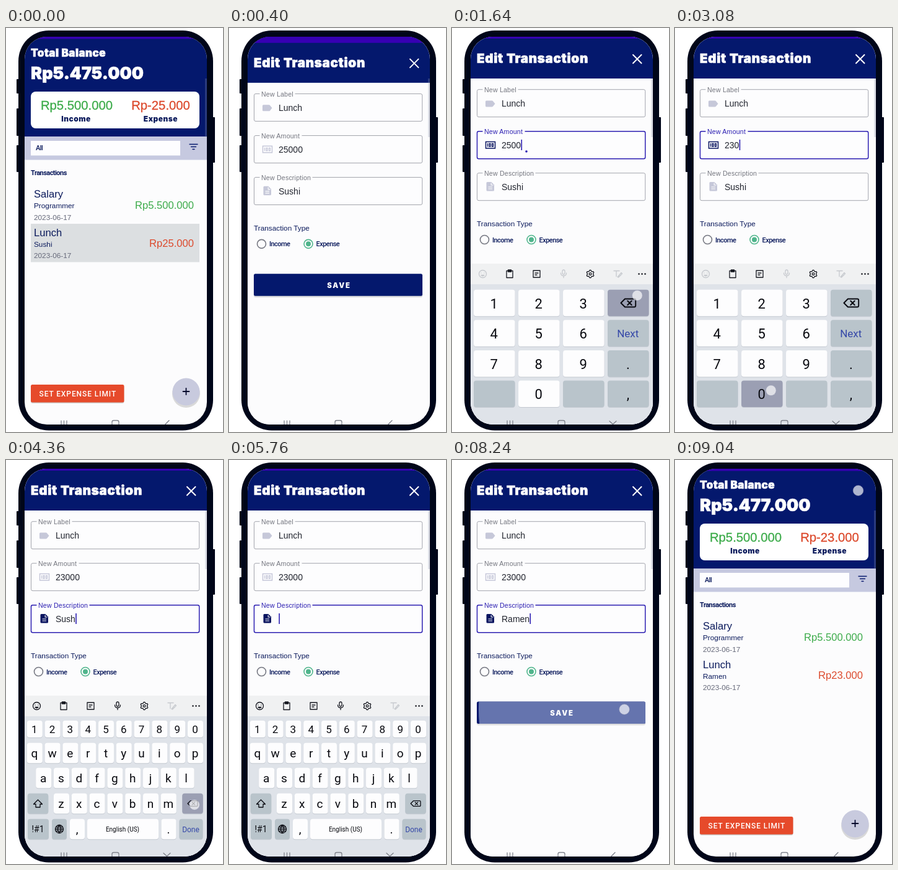
An HTML page for the animation above (9080 ms loop, 350 px wide and 648 px high).

```html
<!DOCTYPE html>
<html lang="en">
<head>
<meta charset="utf-8">
<title>Expense tracker</title>
<style>
  html, body { margin: 0; width: 100%; height: 100%; overflow: hidden; background: #fff; }
  svg { display: block; width: 350px; height: 648px; }
  text { font-family: "Liberation Sans", Arial, sans-serif; fill: #0b1a5c; white-space: pre; }
  .heavy { font-family: Inter, sans-serif; font-weight: 900; letter-spacing: .5px; }
  .title { stroke: #fff; stroke-width: .7px; }
  .narrow { font-family: Roboto, sans-serif; font-size: 11px; font-weight: 500; letter-spacing: -.55px; }
  .key { font-family: Roboto, sans-serif; fill: #08090f; text-anchor: middle; }
  .line { fill: none; stroke: currentColor; stroke-width: 1.3; stroke-linecap: round; stroke-linejoin: round; }
</style>
</head>
<body>
<svg id="stage" viewBox="0 0 350 648"></svg>
<script>
const LOOP = 9080;
const NAVY = '#04186d', PURPLE = '#3700b3', FOCUS = '#2c1fb2', PAPER = '#fcfcfd', FRAME = '#000619';
const GREEN = '#3cab4a', RED = '#dc4a2d', GREY_KEY = '#b9c4cb', PRESSED_KEY = '#9b9fb3';

const rect = (x, y, w, h, fill, more = '') =>
  `<rect x="${x}" y="${y}" width="${w}" height="${h}" fill="${fill}" ${more}/>`;
const text = (x, y, size, value, more = '') =>
  `<text x="${x}" y="${y}" font-size="${size}" ${more}>${value}</text>`;
const line = (d, more = '') => `<path class="line" d="${d}" ${more}/>`;
const group = (id, content, more = '') => `<g id="${id}" ${more}>${content}</g>`;
const fill = color => `style="fill:${color}"`;
const middle = 'text-anchor="middle"';

// Transaction list
function listRow(y, title, noteId, note, priceId, price, color) {
  return text(45, y, 16.6, title) +
    text(45, y + 17, 11.8, note, `id="${noteId}"`) +
    text(45, y + 35.5, 11.8, '2023-06-17', fill('#66697a')) +
    text(303, y + 17.5, 16.6, price, `id="${priceId}" text-anchor="end" ${fill(color)}`);
}

function listScreen() {
  return rect(30, 14, 294, 622, PAPER) + rect(30, 14, 294, 160, NAVY) + rect(30, 14, 294, 3.5, PURPLE) +
    text(40, 46, 17, 'Total Balance', `class="heavy title" ${fill('#fff')}`) +
    text(40, 81.5, 27, '', 'id="balance" class="heavy title" style="fill:#fff;letter-spacing:.1px"') +
    rect(40, 102, 272, 59, '#fff', 'rx="8"') +
    text(114, 131, 20.3, 'Rp5.500.000', `${middle} stroke="${GREEN}" stroke-width=".3" ${fill(GREEN)}`) +
    text(249.5, 131, 20.3, '', `id="spent" ${middle} stroke="${RED}" stroke-width=".3" ${fill(RED)}`) +
    text(113, 149.5, 12, 'Income', `class="heavy" ${middle}`) +
    text(249.5, 149.5, 12, 'Expense', `class="heavy" ${middle}`) +
    rect(30, 174, 294, 37.5, '#c6c9e0') + rect(40, 181, 241, 23.5, '#fdfdff') +
    text(48, 196, 11, 'All', 'class="narrow"') +
    line('M296 186.5h13M298.500 190.500h8M301 194.500h3', `color="${NAVY}"`) +
    text(40, 235.5, 11, 'Transactions', 'class="narrow" style="font-weight:600"') +
    rect(40, 314, 272, 61.5, '#dcdfe1', 'id="rowPress"') +
    listRow(272, 'Salary', 'note1', 'Programmer', 'price1', 'Rp5.500.000', GREEN) +
    listRow(333.5, 'Lunch', 'note2', '', 'price2', '', RED) +
    rect(40, 573.5, 150.5, 28.5, '#000', 'rx="3" opacity=".18"') +
    rect(40, 572, 150.5, 28.5, '#e64a2b', 'rx="2.500"') +
    text(53.5, 591, 12, 'SET EXPENSE LIMIT',
      'style="font-family:Roboto,sans-serif;font-weight:500;letter-spacing:.9px;fill:#fff"') +
    '<circle cx="290.500" cy="586.500" r="22.500" opacity=".14"/><circle cx="290.500" cy="583.500" r="22" fill="#c8cade"/>' +
    line('M285.500 583h10M290.500 578v10', 'color="#05092c" style="stroke-width:1.8"');
}

// Edit form
const icons = {
  label: '<path d="M55.500 116.500h9q1 0 1.500 .7l3.500 4.300-3.500 4.300q-.5 .7-1.500 .7h-9q-1.500 0-1.500-1.500v-7q0-1.500 1.500-1.500z" fill="currentColor"/>',
  amount: rect(54.5, 182.5, 15, 10.5, 'none', 'stroke="currentColor" stroke-width="1.500"') +
    '<path d="M57.500 185v5.500M60 185.500h2v4.500h-2zM64.500 185.500h2v4.500h-2z" fill="none" stroke="currentColor" stroke-width="1.300"/>',
  description: '<path d="M57 247h6.500l4.500 4.500v8.500q0 1.500-1.500 1.500h-9.500q-1.500 0-1.500-1.500v-11.500q0-1.500 1.500-1.500z" fill="currentColor"/>' +
    '<path d="M58.500 255h6.500M58.500 258h6.500M63.200 248.500v3.500h3.500" fill="none" stroke="#fff" stroke-width="1.100"/>'
};

const field = (id, top, title, gap) =>
  rect(40.5, top + .2, 271.2, 44, '#fdfdfe', `id="${id}Box" rx="2.500"`) +
  rect(49.5, top - 3, gap, 6, PAPER) +
  text(52, top + 4.5, 10.6, title, `id="${id}Title" letter-spacing=".2"`) +
  group(id + 'Icon', icons[id]) +
  text(80, top + 27.5, 14, '', `id="${id}Value" ${fill('#22252f')}`);

function editScreen() {
  return rect(30, 14, 294, 630, PAPER) + rect(30, 14, 294, 67, NAVY) + rect(30, 4, 294, 13, PURPLE) +
    text(40, 55.7, 20.5, 'Edit Transaction', 'class="heavy title" style="fill:#fff;letter-spacing:.75px"') +
    line('M292 43l13.500 13.500M305.500 43L292 56.500', 'color="#fff" style="stroke-width:2"') +
    field('label', 98.5, 'New Label', 57) +
    field('amount', 165.5, 'New Amount', 68) +
    field('description', 232.5, 'New Description', 85) +
    rect(0, 0, 1.6, 17, FOCUS, 'id="caret"') +
    `<path id="handle" d="M120 192l4.500 4.500a6.300 6.300 0 1 1-9 0z" fill="${FOCUS}"/>` +
    `<circle id="handleRest" cx="120" cy="198" r="1.800" fill="${FOCUS}"/>` +
    text(40, 318, 11.8, 'Transaction Type') +
    '<circle cx="52.500" cy="339.500" r="7" fill="none" stroke="#777983" stroke-width="1.600"/>' +
    '<circle cx="128" cy="339.500" r="7" fill="none" stroke="#50b58c" stroke-width="1.600"/>' +
    '<circle cx="128" cy="339.500" r="4" fill="#50b58c"/>' +
    text(65, 343.5, 11, 'Income', 'class="narrow"') +
    text(140.5, 343.5, 11, 'Expense', 'class="narrow"') +
    rect(40, 389, 272, 36.5, '#000', 'rx="3" opacity=".12"') +
    rect(40, 387.5, 272, 35.5, NAVY, 'rx="2.500"') +
    '<circle id="ripple" cx="278" cy="400" fill="#8f9ccb" clip-path="url(#saveClip)"/>' +
    text(177.5, 409.8, 11.3, 'SAVE', `class="heavy" ${middle} style="fill:#fff;letter-spacing:1.900px"`);
}

// Keyboards: every key is centred on x, y
const keys = [];
const addKey = (pad, id, x, y, w, h, size, dark = false, face = id) =>
  keys.push({ pad, id, x, y, w, h, size, dark, face });

const eraseIcon = (x, y, s) => line('M-5-6h14q2 0 2 2v8q0 2-2 2h-14l-6-6zM-1-3l6 6M5-3l-6 6',
  `color="#0a0b12" transform="translate(${x} ${y}) scale(${s})" style="stroke-width:1.800"`);
const shiftIcon = (x, y) => line('M0-7l7 7h-3.500v5h-7v-5h-3.500z', `color="#0a0b12" transform="translate(${x} ${y + 1})"`);
const globeIcon = (x, y) => line('M-6.500 0a6.500 6.500 0 1 0 13 0a6.500 6.500 0 1 0-13 0h13M0-6.500q-5.500 6.500 0 13q5.500-6.500 0-13M-5.500-3.200h11M-5.500 3.200h11',
  `color="#0a0b12" transform="translate(${x} ${y})"`);

['123<', '456N', '789.', ' 0 ,'].forEach((row, r) => [...row].forEach((c, i) =>
  addKey('num', c, 68.3 + 72 * i, 441 + 48.6 * r, 66.5, 42.5, c === 'N' ? 17 : 22, i === 3 || c === ' ')));
const letterRow = (row, x, y, h, size) =>
  [...row].forEach((c, i) => addKey('abc', c, x + 28.8 * i, y, 25, h, size));
letterRow('1234567890', 46.3, 431.5, 27, 17);
letterRow('qwertyuiop', 46.3, 470, 32.5, 19);
letterRow('asdfghjkl', 60.7, 510, 32.5, 19);
letterRow('zxcvbnm', 89.5, 551, 32.5, 19);
addKey('abc', '^', 51.5, 551, 33.5, 32.5, 0, true);
addKey('abc', '<', 301, 551, 33.5, 32.5, 0, true);
addKey('abc', 'sym', 52, 592, 34, 32.5, 14, true, '!#1');
addKey('abc', 'globe', 86, 592, 24, 32.5, 0, true);
addKey('abc', ',', 115, 592, 24, 32.5, 19);
addKey('abc', 'space', 188.5, 592, 115, 32.5, 10, false, 'English (US)');
addKey('abc', '.', 262.5, 592, 24, 32.5, 19);
addKey('abc', 'done', 298.5, 592, 38, 32.5, 12, true, 'Done');

function keyMarkup(k, i) {
  const { x, y, w, h } = k;
  let face;
  if (k.id === '<') face = eraseIcon(x, y, k.pad === 'num' ? 1.08 : .72);
  else if (k.id === '^') face = shiftIcon(x, y);
  else if (k.id === 'globe') face = globeIcon(x, y);
  else {
    const blue = k.id === 'N' || k.id === 'done';
    face = text(x - .5, y + k.size * .39, k.size, k.id === 'N' ? 'Next' : k.face,
      `id="face${i}" class="key" ${blue ? fill('#3548a8') : ''}`);
  }
  return rect(x - w / 2, y - h / 2 + 1, w, h, '#a9b0ba', 'rx="4" opacity=".5"') +
    rect(x - w / 2, y - h / 2, w, h, '#fff', `id="key${i}" rx="4"`) + face;
}
const pad = name => group(name + 'Pad', keys.map((k, i) => k.pad === name ? keyMarkup(k, i) : '').join(''));

// Outline of a cog with softly rounded teeth
function cog(teeth, radius, depth) {
  const points = Array.from({ length: 72 }, (_, i) => {
    const a = i * Math.PI / 36, r = radius + depth * Math.tanh(2 * Math.cos(teeth * a));
    return `${(r * Math.sin(a)).toFixed(2)} ${(-r * Math.cos(a)).toFixed(2)}`;
  });
  return `M${points.join('L')}z`;
}

function keyboard() {
  const icon = (x, d, id = '') => line(d, `${id && `id="${id}"`} color="#15171f" transform="translate(${x} 394.500)"`);
  return rect(30, 378, 294, 270, '#dfe3e9') + rect(30, 378, 294, 33, '#f0f1f2') +
    icon(49.5, 'M-6 0a6 6 0 1 0 12 0a6 6 0 1 0-12 0M-2.500-1.500v.1M2.500-1.500v.1M-2.500 2q2.500 2.500 5 0z', 'smiley') +
    icon(93, 'M-5-5h10v11h-10zM-2.500-6.500h5v3h-5z') +
    icon(136.5, 'M-5.500-5.500h11v11h-11zM-2.500-1.500h5M-2.500 1.500h3') +
    icon(180, 'M0-6.500q2 0 2 2v3q0 2-2 2t-2-2v-3q0-2 2-2M-4.500-1.500q0 4.500 4.500 4.500t4.500-4.500M0 3v3', 'mic') +
    icon(223, cog(6, 5.4, .8) + 'M-1.800 0a1.800 1.800 0 1 0 3.600 0a1.800 1.800 0 1 0-3.600 0') +
    line('M-6-5h9M-2-5v9M0 5l6-7 1.500 1.500-6 6z', 'color="#c6c9ce" transform="translate(267 394.500)"') +
    [301.5, 306.5, 311.5].map(x => `<circle cx="${x}" cy="394.500" r="1.300" fill="#15171f"/>`).join('') +
    pad('num') + pad('abc');
}

const stage = document.getElementById('stage');
stage.innerHTML =
  '<defs><clipPath id="screen"><rect x="30" y="14" width="294" height="622" rx="36"/></clipPath>' +
  '<clipPath id="saveClip"><rect x="40" y="387.500" width="272" height="35.500" rx="2.500"/></clipPath></defs>' +
  rect(17, 82, 5, 23, FRAME, 'rx="1"') + rect(17, 129, 5, 44, FRAME, 'rx="1"') +
  rect(17, 188, 5, 43, FRAME, 'rx="1"') + rect(332, 143, 5, 73, FRAME, 'rx="1"') +
  rect(20, 4, 314, 641.5, FRAME, 'rx="49"') +
  `<g clip-path="url(#screen)">${listScreen()}${group('edit', editScreen())}${group('keyboard', keyboard())}` +
  line('M89 630v10M93.500 630v10M98 630v10M171 640v-8q0-2.500 2.500-2.500h6q2.500 0 2.500 2.500v8', 'color="#7f828b"') +
  line('M263 629.500l-6 6 6 6', 'id="navBack" color="#7f828b"') +
  line('M254 630.500l5.500 5 5.500-5', 'id="navDown" color="#7f828b"') +
  '<circle id="touch" r="8.300" fill="#fff" fill-opacity=".68" stroke="#9599b4" stroke-opacity=".45"/></g>' +
  rect(321, 81, 3, 94, '#8d93ae', 'opacity=".28"');

const el = {};
stage.querySelectorAll('[id]').forEach(node => el[node.id] = node);
const show = (node, on) => node.setAttribute('display', on ? 'inline' : 'none');
const attr = (node, values) => Object.entries(values).forEach(([k, v]) => node.setAttribute(k, v));
const setText = (node, value) => { if (node.textContent !== value) node.textContent = value; };
const progress = (t, from, to) => Math.min(1, Math.max(0, (t - from) / (to - from)));

// Key strokes as [time, key id]; taps as [time, x, y]
const strokes = {
  num: [[1560, '<'], [1840, '<'], [2100, '<'], [2360, '<'], [2660, '3'], [3000, '0'], [3240, '0'], [3480, '0']],
  abc: [[4300, '<'], [4540, '<'], [4780, '<'], [5020, '<'], [5300, '<'], [5860, '^'],
    [6080, 'r'], [6340, 'a'], [6620, 'm'], [6900, 'e'], [7200, 'n']]
};
const taps = [[720, 150, 188], [3860, 150, 255], [7560, 259, 631], [8060, 278, 400], [8800, 295.5, 49]];
const KEY_HOLD = 180, TAP_HOLD = 260;

function typed(start, list, t) {
  let value = start, shift = false, last = 0;
  for (const [time, id] of list) {
    if (time > t) break;
    last = time;
    if (id === '^') { shift = true; continue; }
    value = id === '<' ? value.slice(0, -1) : value + (shift ? id.toUpperCase() : id);
    shift = false;
  }
  return { value, shift, last };
}

const thousands = n => String(n).replace(/\B(?=(\d{3})+$)/g, '.');

function drawForm(t, focus, values, last) {
  for (const id of ['label', 'amount', 'description']) {
    const on = id === focus;
    attr(el[id + 'Box'], { stroke: on ? FOCUS : '#a3a5ad', 'stroke-width': on ? 1.5 : 1 });
    el[id + 'Title'].style.fill = on ? FOCUS : '#74767f';
    attr(el[id + 'Icon'], { color: on ? '#0a1560' : '#c6c8d9' });
    setText(el[id + 'Value'], values[id]);
  }
  show(el.caret, focus && (t - last) % 1000 < 500);
  if (focus) attr(el.caret, {
    x: 80.3 + (values[focus] ? el[focus + 'Value'].getComputedTextLength() : 0),
    y: focus === 'amount' ? 179 : 246
  });
  show(el.handle, t >= 820 && t < 1560);
  show(el.handleRest, t >= 1560 && t < 1720);
  const wave = progress(t, 8060, 8240);
  attr(el.ripple, { r: t < 8060 ? 0 : 20 + 215 * wave, opacity: .7 * (1 - progress(t, 8320, 8520)) });
}

function drawKeyboard(t, padName, shift) {
  const rise = 1 - Math.pow(1 - progress(t, 860, 1120), 3);
  const fall = Math.pow(progress(t, 7620, 7820), 2);
  const drop = 270 * (1 - rise + fall);
  attr(el.keyboard, { transform: `translate(0 ${drop})` });
  show(el.keyboard, drop < 269);
  show(el.numPad, padName === 'num');
  show(el.abcPad, padName === 'abc');
  const open = t >= 900 && t < 7650;
  show(el.navDown, open);
  show(el.navBack, !open);
  for (const id of ['smiley', 'mic']) attr(el[id], { color: padName === 'num' ? '#c6c9ce' : '#15171f' });

  const stroke = strokes[padName].find(([time]) => t >= time && t < time + KEY_HOLD);
  let held = null;
  keys.forEach((k, i) => {
    const on = k.pad === padName && stroke && stroke[1] === k.id;
    if (on) held = k;
    attr(el['key' + i], { fill: on ? PRESSED_KEY : k.dark ? GREY_KEY : '#fdfdfe' });
    if (k.pad === 'abc' && /^[a-z]$/.test(k.id)) setText(el['face' + i], shift ? k.id.toUpperCase() : k.id);
  });
  return held;
}

function draw(t) {
  const amount = typed('25000', strokes.num, t);
  const note = typed('Sushi', strokes.abc, t);
  const focus = t < 800 ? null : t < 3920 ? 'amount' : 'description';
  const last = focus === 'amount' ? Math.max(800, amount.last) : Math.max(3920, note.last);

  const saved = t >= 8300;
  const cost = saved ? 23000 : 25000;
  setText(el.balance, 'Rp' + thousands(5500000 - cost));
  setText(el.spent, 'Rp-' + thousands(cost));
  setText(el.price2, 'Rp' + thousands(cost));
  setText(el.note2, saved ? 'Ramen' : 'Sushi');
  show(el.rowPress, t < 460);

  const enter = Math.pow(1 - progress(t, 120, 456), 2.5);
  const leave = Math.pow(progress(t, 8840, 9020), 2);
  const slide = 632 * (enter + leave);
  attr(el.edit, { transform: `translate(0 ${slide})` });
  show(el.edit, slide < 631);
  drawForm(t, focus, { label: 'Lunch', amount: amount.value, description: note.value }, last);

  const held = drawKeyboard(t, t < 4000 ? 'num' : 'abc', note.shift);
  const tap = taps.find(([time]) => t >= time && t < time + TAP_HOLD);
  show(el.touch, held || tap);
  if (tap) attr(el.touch, { cx: tap[1], cy: tap[2] });
  else if (held) {
    const wide = held.pad === 'num';
    attr(el.touch, { cx: held.x + (wide ? 14.5 : 3), cy: held.y + (!wide ? 2 : held.id === '<' ? -12 : -5.5) });
  }
}

const start = performance.now();
function tick() {
  draw((performance.now() - start) % LOOP);
  requestAnimationFrame(tick);
}
tick();
</script>
</body>
</html>
```
